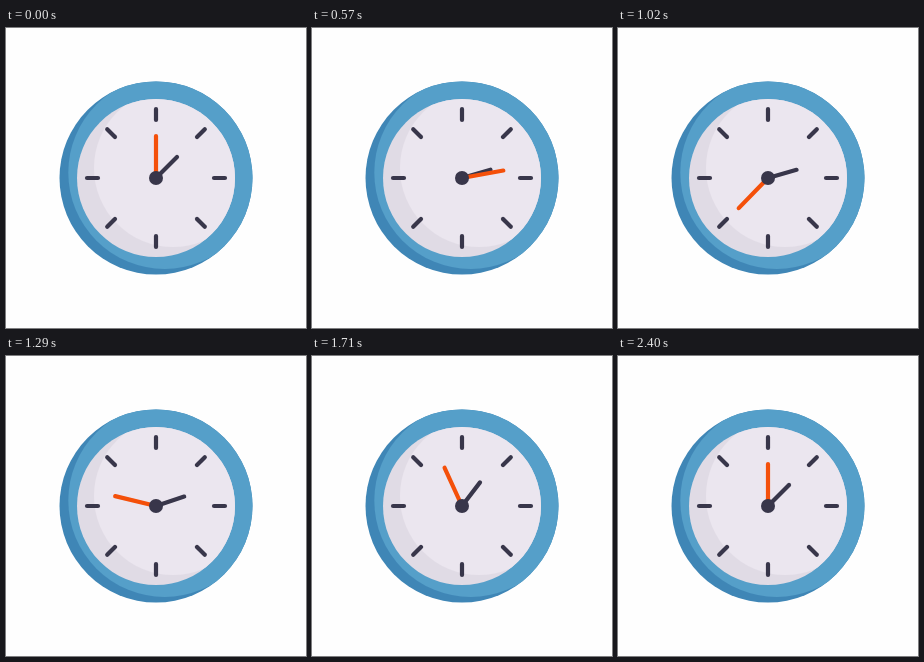
These frames come from a looping animation (300x300 px, 2.46 s). An HTML page:

```html
<!DOCTYPE html>
<html lang="en">
<head>
<meta charset="utf-8">
<title>Clock</title>
<style>
  html, body { margin: 0; width: 100%; height: 100%; overflow: hidden; background: #fefefe; }
  svg { display: block; width: 100%; height: 100%; }
  line { stroke-width: 4.2; stroke-linecap: round; }
</style>
</head>
<body>
<svg viewBox="-150 -150 300 300">
  <clipPath id="rim"><circle r="96.5"/></clipPath>
  <clipPath id="face"><circle r="79"/></clipPath>
  <circle r="96.5" fill="#3f86b6"/>
  <circle cx="8.6" cy="-5.4" r="96.3" fill="#559fc9" clip-path="url(#rim)"/>
  <circle r="79" fill="#e0dbe5"/>
  <circle cx="17" cy="-10" r="79" fill="#ebe6ef" clip-path="url(#face)"/>
  <g id="ticks" stroke="#38364a"></g>
  <line id="hour" y2="-29.7" stroke="#38364a"/>
  <line id="minute" y2="-42" stroke="#f4500a"/>
  <circle r="7" fill="#38364a"/>
</svg>
<script>
const LOOP = 2460, TURN = 2400;
const hourKeys = [[0, 45], [600, 74], [1200, 74], [1800, 35], [2100, 50], [2400, 45]];
const byId = id => document.getElementById(id);

byId('ticks').innerHTML = Array.from({ length: 8 }, (_, i) =>
  `<line y1="-58" y2="-69" transform="rotate(${i * 45})"/>`).join('');

const smooth = p => p * p * (3 - 2 * p);

// Cubic Bezier easing (x1, 0, x2, 1), solved by bisection
function ease(p, x1 = 0.35, x2 = 0.285) {
  let low = 0, high = 1;
  for (let i = 0; i < 24; i++) {
    const s = (low + high) / 2;
    const x = 3 * s * (1 - s) * ((1 - s) * x1 + s * x2) + s ** 3;
    if (x < p) low = s; else high = s;
  }
  return smooth(low);
}

function hourAngle(t) {
  const i = hourKeys.findIndex(([end]) => t <= end);
  if (i === 0) return hourKeys[0][1];
  const [t0, a0] = hourKeys[i - 1], [t1, a1] = hourKeys[i];
  return a0 + (a1 - a0) * smooth((t - t0) / (t1 - t0));
}

function rotate(id, angle) {
  byId(id).setAttribute('transform', `rotate(${angle})`);
}

function draw() {
  const t = Math.min(performance.now() % LOOP, TURN);
  rotate('minute', t < TURN ? 360 * ease(t / TURN) : 0);
  rotate('hour', hourAngle(t));
  requestAnimationFrame(draw);
}
draw();
</script>
</body>
</html>
```
